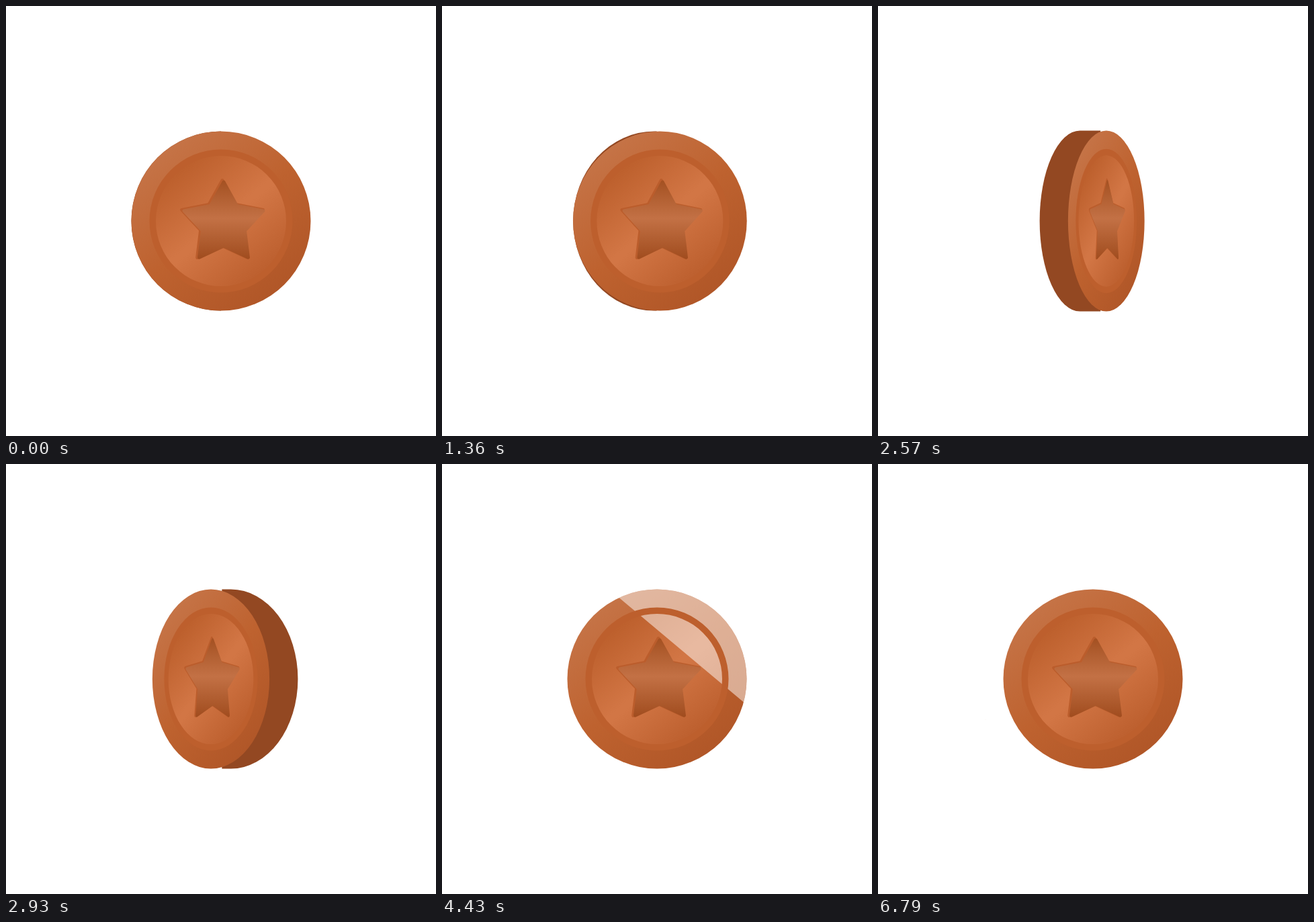
An HTML page with a canvas that plays this animation: 640x640 px, repeating every 7.21 s.

```html
<!DOCTYPE html>
<html lang="en">
<head>
<meta charset="utf-8">
<title>Spinning coin</title>
<style>
  html, body { margin: 0; width: 100%; height: 100%; overflow: hidden; background: #fff; }
  canvas { display: block; }
</style>
</head>
<body>
<canvas id="stage" width="640" height="640"></canvas>
<script>
const ctx = document.getElementById('stage').getContext('2d');
const LOOP = 7210, STEP = 71.45, LAST_STEP = 95;
const MID = 320, R = 133.5, TAU = Math.PI * 2;

const clamp = (x, lo = 0, hi = 1) => Math.min(hi, Math.max(lo, x));

// Piecewise linear curve through [x, y] points
function curve(points, x) {
  for (let i = 1; i < points.length; i++) {
    const [x0, y0] = points[i - 1], [x1, y1] = points[i];
    if (x <= x1) return y0 + (y1 - y0) * (x - x0) / (x1 - x0);
  }
  return points[points.length - 1][1];
}

function gradient(x0, y0, x1, y1, ...stops) {
  const g = ctx.createLinearGradient(x0, y0, x1, y1);
  stops.forEach(([at, color]) => g.addColorStop(at, color));
  return g;
}

function disc(r, fill) {
  ctx.beginPath();
  ctx.arc(0, 0, r, 0, TAU);
  ctx.fillStyle = fill;
  ctx.fill();
}

function star(x, y, outer, fill) {
  ctx.beginPath();
  for (let i = 0; i < 10; i++) {
    const r = i % 2 ? outer * 0.535 : outer, a = i * Math.PI / 5;
    ctx.lineTo(x + r * Math.sin(a), y - r * Math.cos(a));
  }
  ctx.closePath();
  ctx.fillStyle = ctx.strokeStyle = fill;
  ctx.lineWidth = 5;
  ctx.lineJoin = 'round';
  ctx.fill();
  ctx.stroke();
}

// Half turn that leaves at full speed and brakes to a stop
function brake(u) {
  const speed = 0.1855, total = 1283, slow = 626;
  u = Math.min(u, total);
  return u < total - slow ? speed * u : 180 - speed * (total - u) ** 2 / (2 * slow);
}

function spin(t) {
  if (t < 1283) return 180 - brake(1283 - t);
  if (t < 2223) return 180 + (t - 1283) * 180 / 940;
  return 360 + brake(t - 2223);
}

function drawRim(side, tilt, ry) {
  const shift = 0.3 * tilt;
  const reach = curve([[0, R], [15, 124.4], [30, 122.5], [49, 115], [88, 27]], tilt);
  const flat = MID + side * curve([[0, 0], [49, -1.5], [49.1, -1.5], [60, 8], [88, 27]], tilt);
  ctx.beginPath();
  ctx.ellipse(MID - side * shift, MID, Math.max(0, reach - shift), ry, 0, -Math.PI / 2, Math.PI / 2, side > 0);
  ctx.lineTo(flat, MID + ry);
  ctx.lineTo(flat, MID - ry);
  ctx.fillStyle = '#934822';
  ctx.fill();
}

// Diagonal band of light, seen on the border and the inner disc only
function drawShine(t) {
  if (t < 3820 || t > 4730) return;
  const s = clamp((t - 3820) / 910);
  const tail = -209 + 356 * s * s * (3 - 2 * s);
  ctx.save();
  ctx.beginPath();
  ctx.arc(0, 0, R, 0, TAU);
  ctx.arc(0, 0, 106.5, 0, TAU, true);
  ctx.moveTo(97, 0);
  ctx.arc(0, 0, 97, 0, TAU);
  ctx.clip();
  ctx.rotate(-50 * Math.PI / 180);
  ctx.fillStyle = 'rgba(255,255,255,.49)';
  ctx.fillRect(tail, -200, 82, 400);
  ctx.restore();
}

function drawFace(x, rx, ry, t) {
  ctx.save();
  ctx.translate(x, MID);
  ctx.scale(Math.max(rx, 0.5) / R, ry / R);
  disc(R, gradient(-80, -106, 80, 106, [0, '#c57346'], [0.5, '#be622f'], [1, '#b15728']));
  disc(106.5, '#bd5f2d');
  disc(97, gradient(-61, -75, 61, 75, [0, '#bd602d'], [0.49, '#d27645'], [0.53, '#d27645'], [1, '#bd602f']));
  drawShine(t);
  star(2, 3, 63.5, '#bb5d2c');
  star(4, 4, 62, gradient(0, -60, 0, 57, [0, '#a45122'], [0.48, '#c37145'], [1, '#a04c1e']));
  ctx.restore();
}

function drawSparkle(x, y, size, start, t) {
  const grow = clamp((t - start) / 805) ** 1.3;
  const r = size * grow * (1 - clamp((t - start - 805) / 285));
  if (r <= 0) return;
  ctx.beginPath();
  ctx.moveTo(x, y - r);
  for (let i = 1; i <= 4; i++) {
    const a = i * Math.PI / 2, b = a - Math.PI / 4, k = r * 0.2;
    ctx.quadraticCurveTo(x + k * Math.sin(b), y - k * Math.cos(b), x + r * Math.sin(a), y - r * Math.cos(a));
  }
  ctx.fillStyle = '#d47a48';
  ctx.fill();
}

function draw(t) {
  ctx.fillStyle = '#fff';
  ctx.fillRect(0, 0, 640, 640);
  const turn = spin(t) % 180;
  const side = turn <= 90 ? 1 : -1;
  const tilt = side > 0 ? turn : 180 - turn;
  const ry = R + 2.5 * clamp((tilt - 49) / 39);
  if (t < 3500) drawRim(side, tilt, ry);
  drawFace(MID + side * 0.305 * tilt, R * Math.cos(tilt * Math.PI / 180), ry, t);
  drawSparkle(470.5, 208.5, 20, 4800, t);
  drawSparkle(160, 380.5, 17.5, 5700, t);
}

const begin = performance.now();
function tick() {
  const t = (performance.now() - begin) % LOOP;
  draw(Math.min(LAST_STEP, Math.floor((t + 3) / STEP)) * STEP);
  requestAnimationFrame(tick);
}
tick();
</script>
</body>
</html>
```
